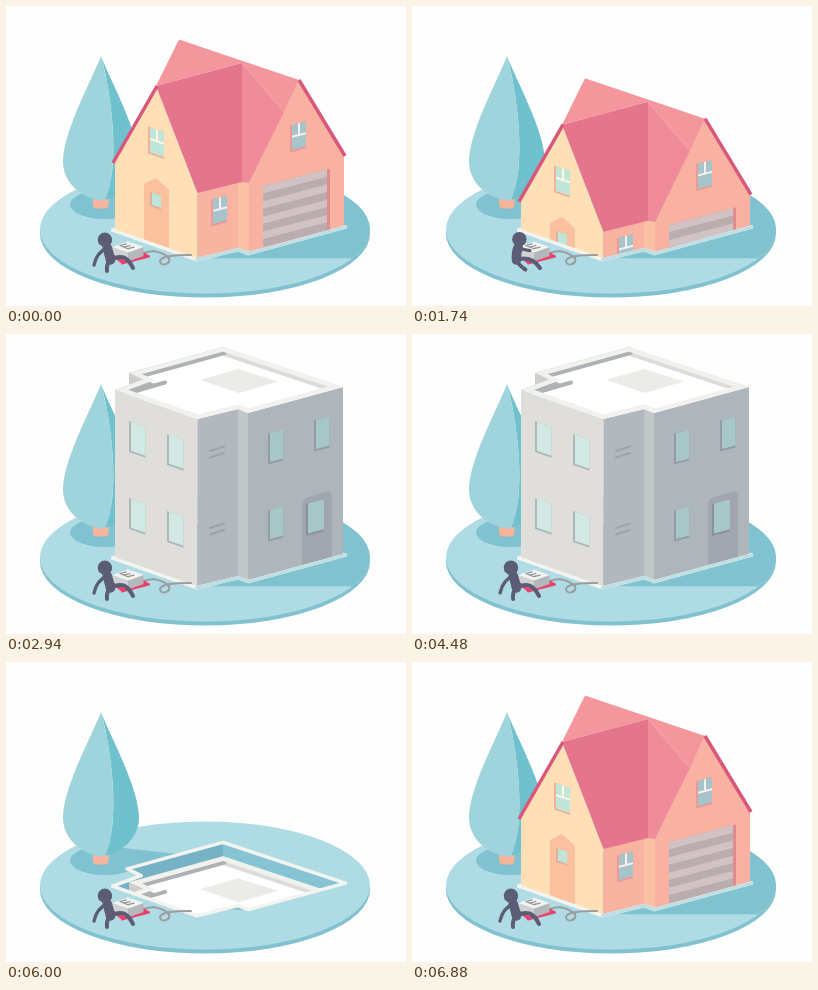
An HTML page with a canvas for the animation above (7880 ms loop, 400 by 300 pixels).

```html
<!DOCTYPE html>
<html lang="en">
<head>
<meta charset="utf-8">
<title>House swap</title>
<style>
html, body { margin: 0; width: 100%; height: 100%; overflow: hidden; background: #fefefe; }
canvas { display: block; width: 100vw; height: 100vh; }
</style>
</head>
<body>
<canvas id="stage"></canvas>
<script>
const LOOP = 7880, HALF = 3980;
const HEIGHT = 168, DEPTH = 240, SINK = 650, RISE = 640;
const LEFT = 0.345, RIGHT = -0.26; // wall slopes
const RIM = '#f3f4f0';

const canvas = document.getElementById('stage');
const ctx = canvas.getContext('2d');
const dpr = window.devicePixelRatio || 1;
canvas.width = 400 * dpr;
canvas.height = 300 * dpr;

const span = (t, from, length) => Math.min(1, Math.max(0, (t - from) / length));
const ease = u => (1 - Math.cos(Math.PI * u)) / 2;
const overshoot = u => 1 + 1.9 * (u - 1) ** 3 + 0.9 * (u - 1) ** 2;
const lerp = (a, b, u) => a + (b - a) * u;
const mix = (p, q, u) => p.map((v, i) => lerp(v, q[i], u));
const add = (p, x, y) => [p[0] + x, p[1] + y];

function trace(points) {
  ctx.beginPath();
  for (const p of points) ctx.lineTo(...p);
}
function poly(color, ...points) {
  trace(points);
  ctx.fillStyle = color;
  ctx.fill();
}
function stroke(color, width) {
  ctx.strokeStyle = color;
  ctx.lineWidth = width;
  ctx.stroke();
}
function line(color, width, ...points) {
  trace(points);
  stroke(color, width);
}
function oval(x, y, rx, ry = rx) {
  ctx.beginPath();
  ctx.ellipse(x, y, rx, ry, 0, 0, 7);
}
function disc(color, ...shape) {
  oval(...shape);
  ctx.fillStyle = color;
  ctx.fill();
}
// Walls run far down; the pit's front edge cuts them off.
function wall(color, ...tops) {
  poly(color, ...tops, [tops.at(-1)[0], 290], [tops[0][0], 290]);
}
function panel(color, x, y, w, h, slope) {
  const dy = w * slope;
  poly(color, [x, y], [x + w, y + dy], [x + w, y + dy + h], [x, y + h]);
}
function pane(x, y, w, h, slope, glass, edge) {
  panel(edge, x, y, w, h, slope);
  panel(glass, x + 2, y + 2 * slope, w - 2, h - 2, slope);
}
function sash(x, y, slope, glass, edge, bar) {
  const w = 16, h = 27;
  pane(x, y, w, h, slope, glass, edge);
  panel(bar, x + 8, y + 8 * slope, 2, h * 0.45, slope);
  panel(bar, x + 2, y + 2 * slope + h * 0.4, w - 2, 2, slope);
}

// Flat roof outline, clockwise from the back; the pit is the same shape on the ground.
const ROOF = [[217, 13], [337, 53], [242, 79], [232, 75], [191.5, 85], [109, 56], [137, 45.5], [123, 39]];
const [BACK, EAST, INNER, STEP, FRONT, WEST, NOTCH, NORTH] = ROOF;
const PIT = ROOF.map(([x, y]) => [222 + (x - 222) * 1.02, 46 + (y - 46) * 1.02 + HEIGHT]);
const PIT_FRONT = PIT.slice(1, 6);

function ground(height) {
  const shade = '#80c2cf';
  disc('#82c2d0', 199, 227.5, 165, 64);
  disc('#afdce4', 199, 223.5, 165, 64);
  disc(shade, 99, 198.5, 35, 14.5);
  poly(shade, [99, 184], [172, 192], [123, 207], [99, 213]);
  if (height <= 0) return;
  const reach = height * 2.2, [back, east, , , front] = PIT;
  ctx.save();
  oval(199, 223.5, 165, 64);
  ctx.clip();
  poly(shade, back, add(back, reach, 0), add(east, reach, 0), add(front, reach, -1.5), add(front, 0, -1.5));
  ctx.restore();
}

function tree() {
  const side = k => {
    ctx.bezierCurveTo(95 + 23 * k, 174 + 17, 95 + 38 * k, 174, 95 + 38 * k, 156);
    ctx.bezierCurveTo(95 + 38 * k, 125, 95 + 8 * k, 72, 95, 50);
  };
  ctx.beginPath();
  ctx.roundRect(87, 188, 15.5, 14.5, 4);
  ctx.fillStyle = '#f4b59b';
  ctx.fill();
  for (const [k, color] of [[1, '#70c1ce'], [-1, '#9fd4dc']]) {
    ctx.beginPath();
    ctx.moveTo(95, 194.5);
    side(k);
    ctx.bezierCurveTo(105, 85, 115, 160, 99, 194);
    ctx.fillStyle = color;
    ctx.fill();
  }
}

function pit() {
  const [back, east, inner] = PIT;
  poly('#75b2c5', ...PIT);
  poly('#86c4d4', back, east, inner, [back[0], inner[1]]);
  line(RIM, 3.5, ...PIT.slice(5), back, east);
}

function house() {
  const apexL = [150, 80], apexR = [293, 74], ridge = [236, 57], peak = [173, 33.5];
  const valley = [278, 106], corner = [191.5, 187], step = [236, 176], inner = [243, 177];
  const eaveL = [107, 157], eaveR = [339, 150];
  wall('#ffdfb5', [109, 156], apexL, corner);
  wall('#f9b3a1', corner, [232, 174]);
  wall('#fbc1a5', [232, 174], inner);
  wall('#f9b1a1', inner, apexR, [338, 149]);
  poly('#f4979d', peak, apexR, valley, ridge, apexL);
  poly('#f08b99', ridge, valley, inner, step);
  poly('#e5758d', apexL, ridge, step, corner);
  ctx.lineCap = 'butt';
  line('#d8587b', 3.5, add(apexL, 1, 0), eaveL);
  line('#d8587b', 3.5, apexR, eaveR);
  ctx.lineCap = 'round';

  poly('#fbc19e', [138, 178], [150, 172], [163, 184], [163, 246], [138, 238]);
  pane(144, 186, 11, 14, LEFT, '#bfe4d8', '#dfb09a');
  sash(142, 120.5, LEFT, '#c0e6da', '#f3b19a', '#fff6e4');
  for (const [x, y] of [[205, 193.5], [284, 119.5]])
    sash(x, y, RIGHT, '#a6c4ca', '#e99a99', '#f8f0ee');

  panel('#df8c8f', 257, 180, 67, 61, RIGHT);
  for (let i = 0; i < 8; i++)
    panel(i % 2 ? '#b9adb0' : '#d1c3c4', 257, 180 + i * 7.6, 64, 7.7, RIGHT);
}

function flatRoof() {
  ctx.save();
  trace(ROOF);
  ctx.closePath();
  ctx.clip();
  ctx.lineJoin = 'miter';
  ctx.fillStyle = '#ffffff';
  ctx.fill();
  const inside = p => add(p, 0, 4);
  line('#dcddda', 9, ...[BACK, EAST].map(inside));
  line('#aeb2b5', 9, ...[WEST, NOTCH, NORTH].map(inside));
  line('#aeb2b5', 9, ...[NORTH, BACK].map(inside));
  line('#aeb2b5', 4, [128, 57.5], [159, 48.5]);
  trace(ROOF);
  ctx.closePath();
  stroke('#f1f1ed', 9);
  ctx.restore();
  poly('#ebebe8', [194, 46], [232, 35], [272, 47.5], [233, 59]);
}

function flats() {
  const glassL = '#d2e9e3', edgeL = '#adb8b9', glassR = '#a6c6c7', edgeR = '#949ba1';
  wall('#cfcfcb', NORTH, NOTCH);
  wall('#dfdeda', WEST, FRONT);
  wall('#b2b8bd', FRONT, STEP);
  wall('#c1c6c7', STEP, INNER);
  wall('#aeb5bb', INNER, EAST);
  flatRoof();
  for (const y of [0, 77]) {
    for (const i of [0, 1])
      pane(123 + 38 * i, 87 + 13 * i + y, 16.5, 31, LEFT, glassL, edgeL);
    pane(262, 99.5 + y, 15.5, 31, RIGHT, glassR, edgeR);
    for (const dy of [0, 6.5])
      line('#9da3a9', 2, [204, 117 + y + dy], [218, 112.5 + y + dy]);
  }
  pane(308, 86.5, 15.5, 31, RIGHT, glassR, edgeR);
  poly('#a0a5ae', [296, 169], [299, 164], [323, 157], [326, 159], [326, 223], [296, 231]);
  pane(300, 170, 18, 32, RIGHT, glassR, '#8b9199');
}

function building(draw, drop) {
  ctx.save();
  trace([[342, 0], [342, 221], ...PIT_FRONT, [104, 222], [104, 0]]);
  ctx.clip();
  ctx.translate(0, drop);
  draw();
  ctx.restore();
}

function device(press) {
  ctx.beginPath();
  ctx.moveTo(138, 247);
  ctx.bezierCurveTo(148, 243, 158, 247, 163, 252);
  ctx.bezierCurveTo(165, 258, 156, 261, 154, 256);
  ctx.bezierCurveTo(153, 250, 168, 249, 185, 249);
  stroke('#999da0', 2);

  const slab = (x, y, rx, ry, h, top, west, east) => {
    const w = [x - rx, y], s = [x, y + ry], e = [x + rx, y];
    poly(west, w, s, add(s, 0, h), add(w, 0, h));
    poly(east, s, e, add(e, 0, h), add(s, 0, h));
    poly(top, w, [x, y - ry], e, s);
  };
  const red = '#e8426d', ink = '#8f9296';
  poly(red, [106, 250], [134, 244], [144, 250], [116, 258]);
  line(red, 2, [116, 257.5], [143, 250.5]);
  slab(122, 241 + 7 * press, 15.5, 5.5, 8 * (1 - press) + 1, '#f3f3ef', '#d0d2d2', '#b4b8ba');
  if (press > 0.5) return;
  const y = 239.5 + 7 * press;
  line(ink, 1.2, [114, y], [122, y + 3.2]);
  for (let i = 0; i < 3; i++)
    line(ink, 1.2, [114 + 4 * i, y + 1.6 * i], [120 + 4 * i, y + 1.6 * i - 1.6]);
}

// lean: 0 sitting back, 1 bent over the box; lift: standing up; grip: hands on the box
function person(lean, lift, grip, press) {
  const ink = '#5b5c75';
  const hip = [104.5, 254], tilt = lerp(-0.27, 0.55, lean), tall = 21 + 11 * lift;
  const along = k => add(hip, Math.sin(tilt) * tall * k, -Math.cos(tilt) * tall * k);
  const neck = along(0.6);
  const limb = (width, from, bend, to) => {
    ctx.beginPath();
    ctx.moveTo(...from);
    ctx.quadraticCurveTo(...bend, ...to);
    stroke(ink, width);
  };
  const arm = (rest, reach) => {
    const hand = mix(rest, [reach, 238 + 8 * press], grip);
    limb(3.4, neck, add(mix(neck, hand, 0.5), -4, -4 + 8 * grip), hand);
  };
  limb(4, hip, [119, 245 + 8 * grip], mix([127, 262], [129, 262], grip));
  limb(4, hip, mix([100, 258], [112, 259], grip), mix([101, 265], [126, 262], grip));
  limb(9.5, hip, add(mix(hip, neck, 0.5), -3 * lean, -1), neck);
  arm([88, 259], 122);
  arm([108, 251], 128);
  disc(ink, ...along(1), 7.2);
}

function dropAt(t, sinkAt, riseAt) {
  return t < riseAt
    ? DEPTH * ease(span(t, sinkAt, SINK))
    : DEPTH * (1 - overshoot(span(t, riseAt, RISE)));
}

function render(t) {
  const second = t >= HALF;
  const drop = second ? dropAt(t, 5565, 6240) : dropAt(t, 1570, 2300);
  const showFlats = t >= 2260 && t < 6230;
  const s = second ? t - HALF : t;
  const stand = ease(span(s, 480, 460));
  const push = ease(span(s, 1160, 260));
  const away = 1 - ease(span(s, 1600, 280));
  const press = push * (1 - span(s, 1590, 110));

  ctx.setTransform(dpr, 0, 0, dpr, 0, 0);
  ctx.fillStyle = '#fefefe';
  ctx.fillRect(0, 0, 400, 300);
  ctx.lineJoin = ctx.lineCap = 'round';
  ground(HEIGHT - drop);
  tree();
  pit();
  building(showFlats ? flats : house, drop);
  line(RIM, 3.5, ...PIT_FRONT);
  if (drop < HEIGHT) line('#bfdfe2', 3.5, ...PIT_FRONT.slice(0, 4));
  device(press);
  person(lerp(0.5 * stand, 1, push) * away, stand * (1 - push), stand * away, press);
}

const start = performance.now();
function tick() {
  render((performance.now() - start) % LOOP);
  requestAnimationFrame(tick);
}
tick();
</script>
</body>
</html>
```
